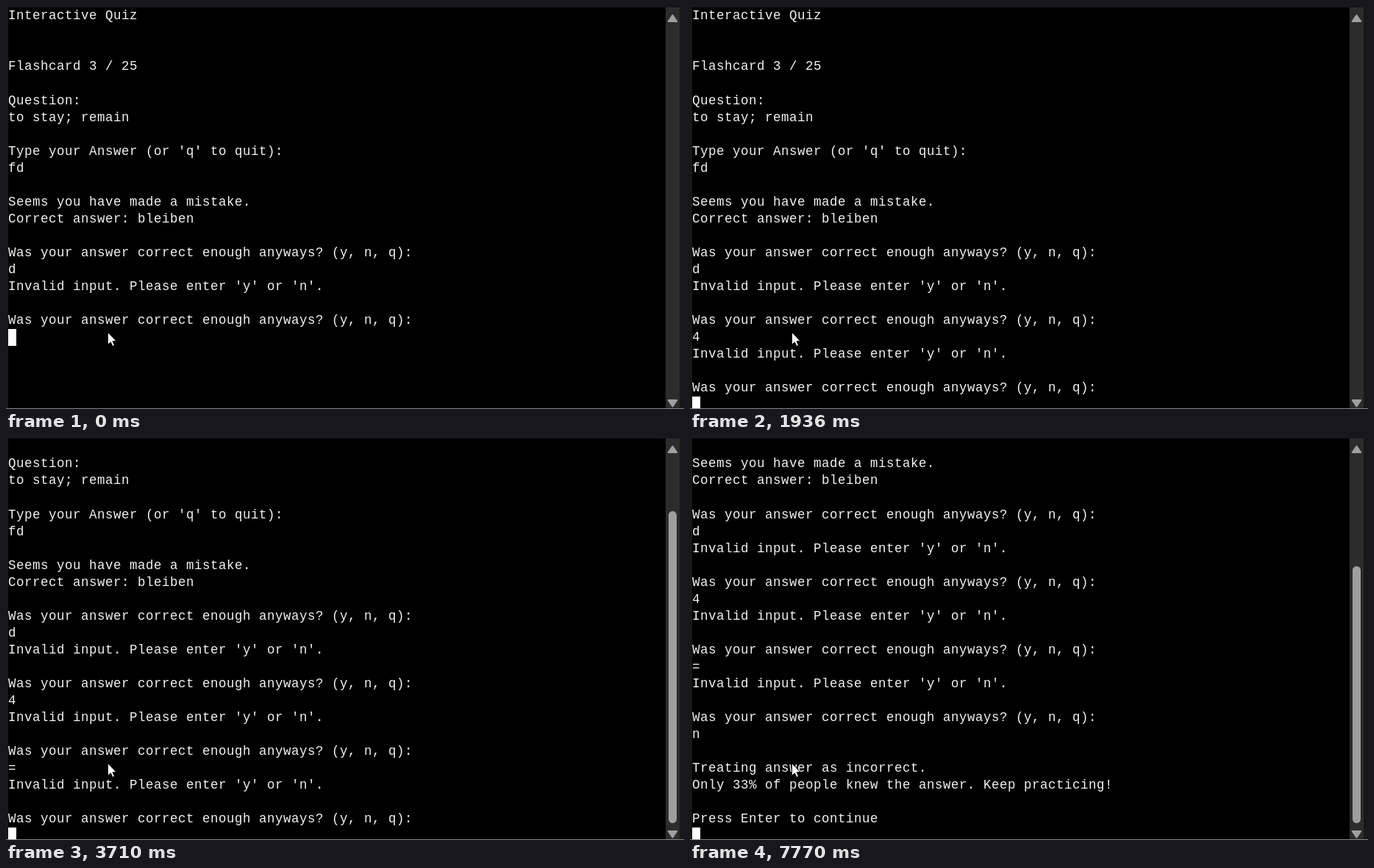
An HTML page that plays this animation: 922x549 px, repeating every 8 s.

```html
<!DOCTYPE html>
<html lang="en">
<head>
<meta charset="utf-8">
<title>Interactive Quiz</title>
<style>
  :root { --row: 23.05px; --loop: 8s step-end infinite; }
  html, body { margin: 0; width: 100%; height: 100%; overflow: hidden; background: #181818; }
  #stage { position: relative; width: 922px; height: 549px; overflow: hidden; background: #181818; }
  #term { position: absolute; left: 3px; top: 2px; width: 894px; height: 546px; overflow: hidden; background: #000; }
  #log {
    position: absolute; left: 0; top: 0; margin: 0; padding-top: .35px; color: #f2f2f2;
    font: 17.5px/var(--row) "Courier New", "Liberation Mono", monospace;
    letter-spacing: .5px;
    font-variant-ligatures: none;
    animation: scroll var(--loop);
  }
  #caret { position: absolute; left: 0; top: 438px; width: 11px; height: 23px; background: #fff; animation: caret var(--loop); }
  #edge { position: absolute; left: 0; top: 548px; width: 922px; height: 1px; background: #8d8587; }
  #bar { position: absolute; left: 897px; top: 2px; width: 19px; height: 546px; background: #2c2c2c; }
  #thumb { position: absolute; left: 4px; top: 99px; width: 11px; height: 425px; border-radius: 5.5px; background: #9f9f9f; animation: thumb var(--loop); }
  svg { position: absolute; left: 0; top: 0; }

  .key1 { animation: key1 var(--loop); }
  .out1 { animation: out1 var(--loop); }
  .key2 { animation: key2 var(--loop); }
  .out2 { animation: out2 var(--loop); }
  .key3 { animation: key3 var(--loop); }
  .out3 { animation: out3 var(--loop); }

  @keyframes key1 { 0% { visibility: hidden } 5%, 100% { visibility: visible } }
  @keyframes out1 { 0% { visibility: hidden } 14.375%, 100% { visibility: visible } }
  @keyframes key2 { 0% { visibility: hidden } 30.75%, 100% { visibility: visible } }
  @keyframes out2 { 0% { visibility: hidden } 46.375%, 100% { visibility: visible } }
  @keyframes key3 { 0% { visibility: hidden } 84.625%, 100% { visibility: visible } }
  @keyframes out3 { 0% { visibility: hidden } 97.125%, 100% { visibility: visible } }
  @keyframes scroll {
    0% { top: 0 }
    46.375% { top: calc(-4 * var(--row)) }
    97.125%, 100% { top: calc(-10 * var(--row)) }
  }
  @keyframes caret {
    0% { left: 0; top: 438px }
    5% { left: 11px; top: 438px }
    14.375% { left: 0; top: 530px }
    30.75% { left: 11px; top: 530px }
    46.375% { left: 0; top: 530px }
    84.625% { left: 11px; top: 530px }
    97.125%, 100% { left: 0; top: 530px }
  }
  @keyframes thumb {
    0% { visibility: hidden }
    46.375% { visibility: visible; top: 99px; height: 425px }
    97.125%, 100% { visibility: visible; top: 174px; height: 350px }
  }
</style>
</head>
<body>
<div id="stage">
  <div id="term">
<pre id="log">Interactive Quiz


Flashcard 3 / 25

Question:
to stay; remain

Type your Answer (or 'q' to quit):
fd

Seems you have made a mistake.
Correct answer: bleiben

Was your answer correct enough anyways? (y, n, q):
d
Invalid input. Please enter 'y' or 'n'.

Was your answer correct enough anyways? (y, n, q):
<span class="key1">4</span>
<span class="out1">Invalid input. Please enter 'y' or 'n'.

Was your answer correct enough anyways? (y, n, q):</span>
<span class="key2">=</span>
<span class="out2">Invalid input. Please enter 'y' or 'n'.

Was your answer correct enough anyways? (y, n, q):</span>
<span class="key3">n</span>
<span class="out3">
Treating answer as incorrect.
Only 33% of people knew the answer. Keep practicing!

Press Enter to continue</span></pre>
    <div id="caret"></div>
  </div>
  <div id="bar"><div id="thumb"></div></div>
  <div id="edge"></div>
  <svg width="922" height="549">
    <g fill="#9f9f9f" stroke="#9f9f9f" stroke-width="2" stroke-linejoin="round">
      <path d="M906.5 12.5L912.3 21H900.7Z"/>
      <path d="M906.5 545.5L912.3 537H900.7Z"/>
    </g>
    <path d="M138.5 444.5V461.5L142.3 457.8L144.9 463.5L147.6 462.3L145.1 456.7H150.2Z" fill="#fff" stroke="#000"/>
  </svg>
</div>
</body>
</html>
```
